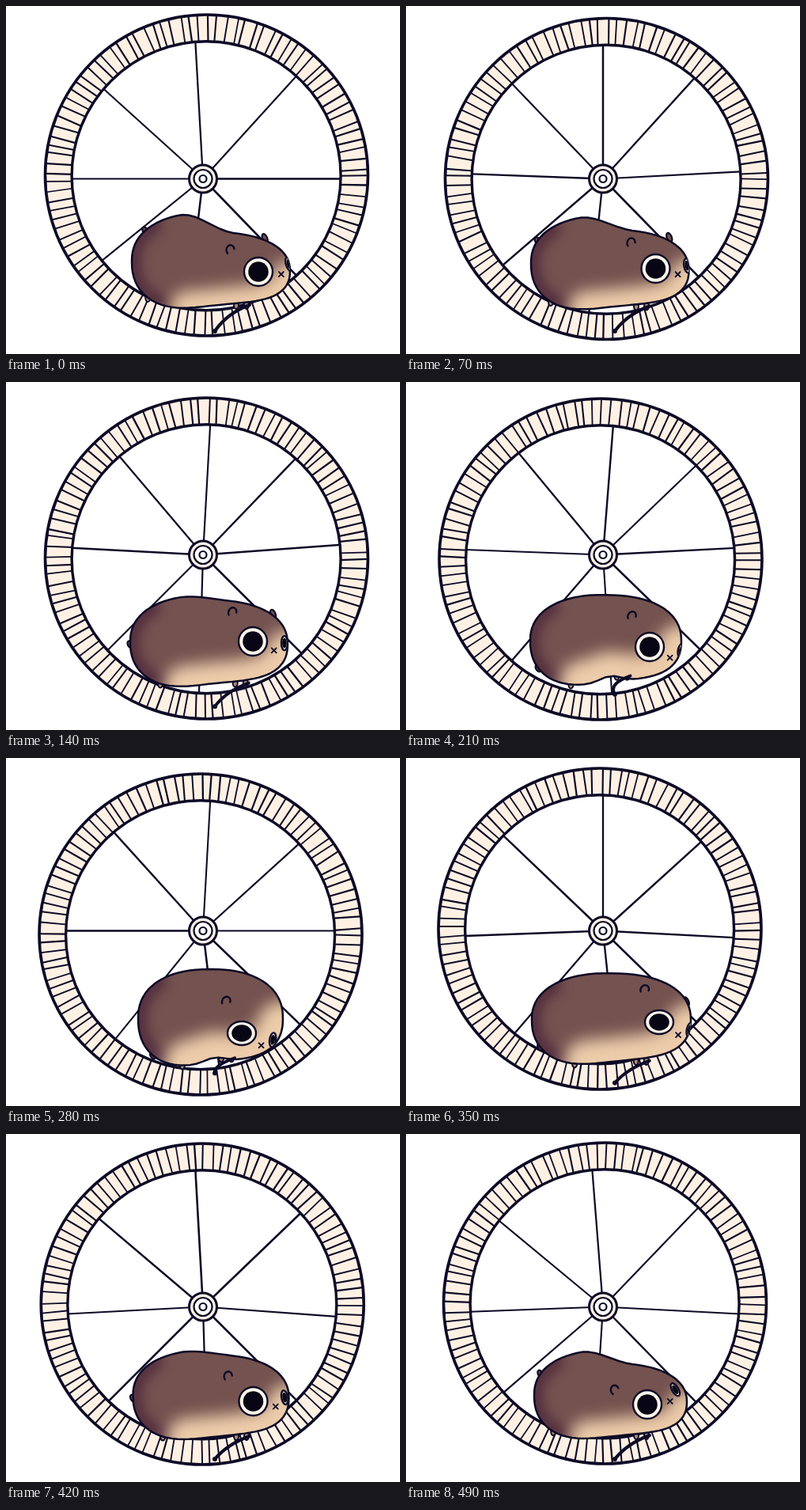
An HTML page with a canvas for the animation above (560 ms loop, 498x440 px).

```html
<!DOCTYPE html>
<html lang="en">
<head>
<meta charset="utf-8">
<title>Hamster wheel</title>
<style>
  html, body { margin: 0; width: 100%; height: 100%; overflow: hidden; background: #fff; }
  canvas { display: block; width: 498px; height: 440px; }
</style>
</head>
<body>
<canvas id="stage" width="498" height="440"></canvas>
<script>
const ctx = document.getElementById('stage').getContext('2d');
const INK = '#0d0a26', CREAM = '#fef1e4', FUR = '#74524f', SHADE = '#55303f', BELLY = '#ecccaa';
const STEP = 70, STEPS = 8, SLATS = 104, TAU = Math.PI * 2;
const HUB = [249, 218.5];

// step, wheel centre x y, body box left top right bottom, eye x y, nod in degrees
const keys = [
  [0, 253.5, 214, 159, 267, 359, 385, 319, 336, 6],
  [2, 253.5, 223, 157, 271, 356, 388, 312, 328, 23],
  [3, 246, 224, 157, 269, 348, 386, 308, 335, 28],
  [4, 246, 223, 167, 267, 350, 392, 298, 348, 32],
  [5, 245, 216, 159, 272, 360, 390, 320, 334, 34],
  [7, 251.5, 214, 162, 277, 355, 388, 305, 342, -8]
];

// Sway of each spoke, clockwise from the top: degrees, phase in steps
const sways = [[4.5, -1], [3, -2.5], [4.2, 4], [1, 2], [7, 1.7], [6, 2], [3, 0], [5.5, -.7]];

const wave = steps => Math.sin(steps / STEPS * TAU);
const bend = v => Math.sign(v) * Math.abs(v) ** .87;
const smooth = v => { v = Math.min(1, Math.max(0, v)); return v * v * (3 - 2 * v); };
const polar = ([x, y], r, degrees) =>
  [x + r * Math.cos(degrees * TAU / 360), y + r * Math.sin(degrees * TAU / 360)];

function poseAt(step) {
  const next = keys.find(k => k[0] >= step);
  const prev = keys.findLast(k => k[0] <= step);
  const mix = next === prev ? 0 : (step - prev[0]) / (next[0] - prev[0]);
  const [, wx, wy, left, top, right, bottom, ex, ey, nod] = prev.map((v, i) => v + (next[i] - v) * mix);
  return {
    wheel: [wx, wy], left, top, right, bottom, eye: [ex, ey], nod,
    crouch: (1 - wave(step + 2)) / 2,
    tuck: Math.max(0, wave(step - 1.4)) ** 4
  };
}

function randomFrom(seed) {
  return () => (seed = (seed * 16807) % 2147483647) / 2147483647;
}

// Rounded body outline, clockwise from the left: sloping shoulder, lifted belly
function bodyPoint(p, a) {
  const x = .5 - .5 * bend(Math.cos(a));
  let y = .5 - .5 * bend(Math.sin(a));
  const slope = (1 - p.crouch) ** 2, depth = Math.max(0, 2 * y - 1);
  y += slope * (1 - y) * (.21 * smooth((x - .3) / .35) - .05);
  y -= depth * (.065 * Math.sin(4.4 * (x - .3)) + .08 * p.tuck * Math.exp(-(((x - .53) / .1) ** 2)));
  return [p.left + x * (p.right - p.left), p.top + y * (p.bottom - p.top)];
}

function bodyArc(p, from, to) {
  const path = new Path2D();
  for (let i = 0; i <= 80; i++) path.lineTo(...bodyPoint(p, (from + (to - from) * i / 80) * Math.PI));
  return path;
}

function oval([x, y], rx, ry = rx, tilt = 0, from = 0, to = TAU) {
  const path = new Path2D();
  path.ellipse(x, y, rx, ry, tilt, from, to);
  return path;
}

function paint(path, fill, width = 0, color = INK) {
  if (fill) { ctx.fillStyle = fill; ctx.fill(path); }
  if (width) { ctx.lineWidth = width; ctx.strokeStyle = color; ctx.stroke(path); }
}

function line(from, to, width) {
  const path = new Path2D();
  path.moveTo(...from);
  path.lineTo(...to);
  paint(path, null, width);
}

function clipped(path, draw) {
  ctx.save();
  ctx.clip(path);
  draw();
  ctx.restore();
}

function drawWheel(p, step) {
  const random = randomFrom(7919 * (step + 1));
  const [x, y] = p.wheel;
  const outer = oval(p.wheel, 204, 203), inner = oval([x - .4, y + .8], 170);
  paint(outer, CREAM);
  for (let i = 0; i < SLATS; i++) {
    const a = (i + random() * .4) / SLATS * 360;
    line(polar(p.wheel, 169, a + random() - .5), polar(p.wheel, 203, a), 1.7 + random() * .6);
  }
  paint(inner, '#fff');
  clipped(inner, () => sways.forEach(([sway, phase], i) =>
    line(HUB, polar(HUB, 200, 45 * i - 90 + sway * wave(step + phase)), 2 + random() * .6)));
  paint(outer, null, 3.6);
  paint(inner, null, 3.4);

  paint(oval(HUB, 17.5), CREAM, 3);
  paint(oval(HUB, 11.5), '#fff', 2.2);
  paint(oval(HUB, 4.5), '#fff', 2.2);
}

function drawEye(center, rx, ry, tilt = 0) {
  paint(oval(center, rx, ry, tilt), '#fdf5ea', 2.4);
  paint(oval(center, rx * .71, ry * .71, tilt), '#080615');
}

function drawHamster(p) {
  const { eye, nod, tuck, crouch } = p;
  const tilt = nod * TAU / 360, body = bodyArc(p, 0, 2);
  const soft = (path, width, color, blur) => {
    ctx.filter = `blur(${blur}px)`;
    paint(path, null, width, color);
  };
  const paw = [308 - 30 * tuck, p.bottom - 7 - 9 * tuck];
  const onBody = turn => bodyPoint(p, turn * Math.PI);

  paint(oval(polar(eye, 43, 272 + 1.5 * nod), 3, 6, -.4), FUR, 2.2);
  paint(oval(onBody(.2 - .42 * crouch), 3, 5, -.5), FUR, 2.2);
  const feet = [onBody(1.78 - .17 * crouch), [paw[0] - 17, paw[1]], [paw[0] - 4, paw[1]]];
  for (const foot of feet) paint(oval(foot, 3, 5), '#b28a78', 2);

  paint(body, FUR);
  clipped(body, () => {
    soft(bodyArc(p, 1.7, 2.25), 24, SHADE, 7);
    soft(bodyArc(p, 1.04, 1.58), 42 + 22 * crouch, BELLY, 10);
  });
  paint(body, null, 2.5);

  const tip = [264, 411 - 20 * tuck], limb = new Path2D();
  limb.moveTo(...paw);
  limb.quadraticCurveTo(paw[0] - 28, paw[1] + 10, ...tip);
  paint(limb, null, 4);
  paint(oval(tip, 3), INK);

  paint(oval(polar(eye, 45, 212 + nod), 5, 6, tilt, 2.2, 6), null, 2.4);
  drawEye(eye, 18, 18 - 3 * smooth((nod - 28) / 4));
  clipped(body, () => drawEye(polar(eye, 40, nod - 20), 4, 9, tilt - .4));

  const [mx, my] = polar(eye, 29, nod);
  for (const side of [-1, 1]) line([mx - 3, my - 3 * side], [mx + 3, my + 3 * side], 1.8);
}

const start = performance.now();
let shown = -1;
function tick() {
  const step = Math.floor((performance.now() - start) / STEP) % STEPS;
  if (step !== shown) {
    shown = step;
    const pose = poseAt(step);
    ctx.clearRect(0, 0, 498, 440);
    ctx.lineCap = ctx.lineJoin = 'round';
    drawWheel(pose, step);
    drawHamster(pose);
  }
  requestAnimationFrame(tick);
}
tick();
</script>
</body>
</html>
```
